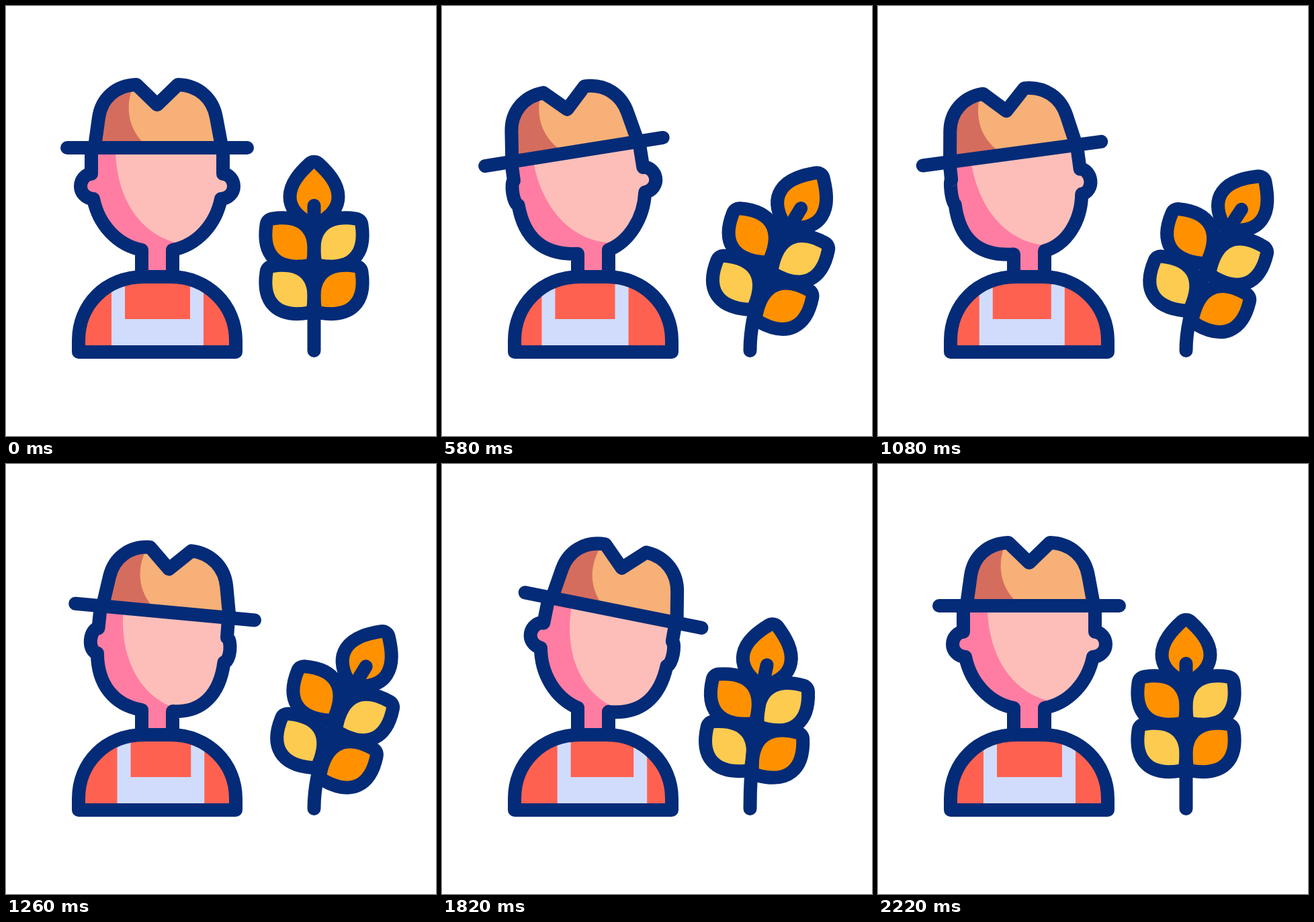
Write an HTML page with a canvas that moves like this. It is 640 by 640 pixels and loops after 2400 ms.

```html
<!DOCTYPE html>
<html lang="en">
<head>
<meta charset="utf-8">
<title>Farmer and wheat</title>
<style>
  html, body { margin: 0; width: 100%; height: 100%; overflow: hidden; background: #fff; }
  canvas { display: block; }
</style>
</head>
<body>
<canvas id="stage" width="640" height="640"></canvas>
<script>
const ctx = document.getElementById('stage').getContext('2d');
const LOOP = 2400;
const INK = '#042b77', ORANGE = '#ff9100', YELLOW = '#fdcb50';

// The head is drawn around the middle of the hat brim; farL and farR flatten the ear turned away
const front = { x: 225, y: 211, angle: 0, farL: 0, farR: 0, bibL: 157, bibR: 294 };
const left = { x: 185, y: 219.5, angle: -12.7, farL: 1, farR: 0, bibL: 145, bibR: 271 };
const right = { x: 268, y: 220.5, angle: 16.2, farL: 0, farR: 1, bibL: 178, bibR: 310 };
const turnKeys = [[0, front], [120, front], [865, left], [1565, right], [2220, front], [LOOP, front]];

const upright = { bend: 0, drop: 0 };
const leaning = { bend: 0.84, drop: 0.52 };
const bent = { bend: 1, drop: 1 };
const swayKeys = [[0, upright], [120, upright], [610, leaning], [905, bent], [1220, leaning],
  [1520, bent], [1980, upright], [LOOP, upright]];

const crown = new Path2D('M-93-2L-87-45C-83-73-62-93-31-94L0-64L31-94C62-93 83-73 88-45L96-2');
const crownLight = new Path2D('M-36-91C-46-66-47-31-17-4H110V-110H-36Z');
const faceLight = new Path2D('M-62-10C-65 79-20 134 37 143L175 189V-10Z');
const brim = new Path2D('M-134 0H134');
const torso = new Path2D('M108 515V498C108 445 148 403 206 403H245C300 403 342 445 342 498V515Z');
const leafShape = new Path2D('M-25-25C14-31 31-14 25 25C-14 31-31 14-25-25Z');
const tipShape = new Path2D('M0-35C14-22 26-8 26 7C26 22 12 32 0 38C-12 32-26 22-26 7C-26-8-14-22 0-35Z');

const smooth = u => u * u * (3 - 2 * u);
const smoother = u => u * u * u * (u * (6 * u - 15) + 10);

function poseAt(keys, ease, t) {
  const i = keys.findIndex(key => key[0] > t);
  const [t0, a] = keys[i - 1], [t1, b] = keys[i];
  const k = ease((t - t0) / (t1 - t0));
  return Object.fromEntries(Object.keys(a).map(name => [name, a[name] + (b[name] - a[name]) * k]));
}

const frameAt = (x, y, angle, side = 1) => new DOMMatrix().translate(x, y).rotate(angle).scale(side, 1);

function moved(shape, matrix) {
  const result = new Path2D();
  result.addPath(shape, matrix);
  return result;
}

function fill(shape, color) {
  ctx.fillStyle = color;
  ctx.fill(shape);
}

function stroke(shape, width = 20) {
  ctx.lineWidth = width;
  ctx.stroke(shape);
}

function clipped(shape, draw) {
  ctx.save();
  ctx.clip(shape);
  draw();
  ctx.restore();
}

function twoTone(shape, dark, lightShape, light) {
  fill(shape, dark);
  clipped(shape, () => fill(lightShape, light));
  stroke(shape);
}

// One side of the head, from the brim past the ear and jaw down to the neck
function profile(side, far, matrix) {
  const ear = (out, y) => [95 - far + out * (1 - far), y - 15 * far];
  const outline = [
    [98 - 5 * far, 0], ear(3, 39),
    ear(12, 39), ear(19, 48), ear(19, 57.5),
    ear(19, 67), ear(11, 76), ear(0, 76),
    [87 + 9 * far, 115], [59 + 15 * far, 145]
  ].map(([x, y]) => {
    const p = matrix.transformPoint({ x: side * x, y });
    return [p.x, p.y];
  });
  const neck = 225 + side * 23;
  return [...outline, [neck, 363 + 8 * far], [neck, 405]];
}

function headPath(pose, matrix) {
  const points = [...profile(-1, pose.farL, matrix), ...profile(1, pose.farR, matrix).reverse()];
  const take = { M: 1, L: 1, C: 3 };
  return new Path2D('MLCCCLLLCCCL'.replace(/./g, c => c + points.splice(0, take[c])));
}

function drawPerson(pose) {
  const matrix = frameAt(pose.x, pose.y, pose.angle);
  twoTone(headPath(pose, matrix), '#ff7da2', moved(faceLight, matrix), '#fdbeb9');

  const { bibL, bibR } = pose;
  const bib = new Path2D(`M${bibL} 400h20V466H${bibR - 20}V400h20V515H${bibL}Z`);
  fill(torso, '#ff6151');
  clipped(torso, () => fill(bib, '#d1dcfd'));
  stroke(torso);

  twoTone(moved(crown, matrix), '#d56d5f', moved(crownLight, matrix), '#f7b077');
  stroke(moved(brim, matrix));
}

function drawWheat({ bend, drop }) {
  const x = 458.5;
  const parts = [{
    color: ORANGE,
    shape: moved(tipShape, frameAt(x + 96.5 * bend, 277 + 20.5 * drop, 40 * bend))
  }];
  // A pair of leaves shifts with the stem while its right leaf sinks and its left one lifts
  const addPair = (y, shift, colors) => [1, -1].forEach((mirror, i) => {
    const side = -mirror;
    const spot = frameAt(x + shift * bend + 36 * side, y + 14 * drop + 21 * side * bend,
      (20 + 4 * side) * bend, mirror);
    parts.push({ color: colors[i], shape: moved(leafShape, spot) });
  });
  addPair(351.5, 46.5, [ORANGE, YELLOW]);
  addPair(422, 18, [YELLOW, ORANGE]);

  for (const p of parts) stroke(p.shape, 40);
  for (const p of parts) fill(p.shape, p.color);
  stroke(new Path2D(`M${x} 513Q${x} ${405 + 22 * bend} ${x + 91 * bend} ${297 + 8 * drop}`));
}

const start = performance.now();

function frame() {
  const t = (performance.now() - start) % LOOP;
  ctx.fillStyle = '#fff';
  ctx.fillRect(0, 0, 640, 640);
  ctx.strokeStyle = INK;
  ctx.lineCap = ctx.lineJoin = 'round';
  drawPerson(poseAt(turnKeys, smoother, t));
  drawWheat(poseAt(swayKeys, smooth, t));
  requestAnimationFrame(frame);
}
frame();
</script>
</body>
</html>
```
